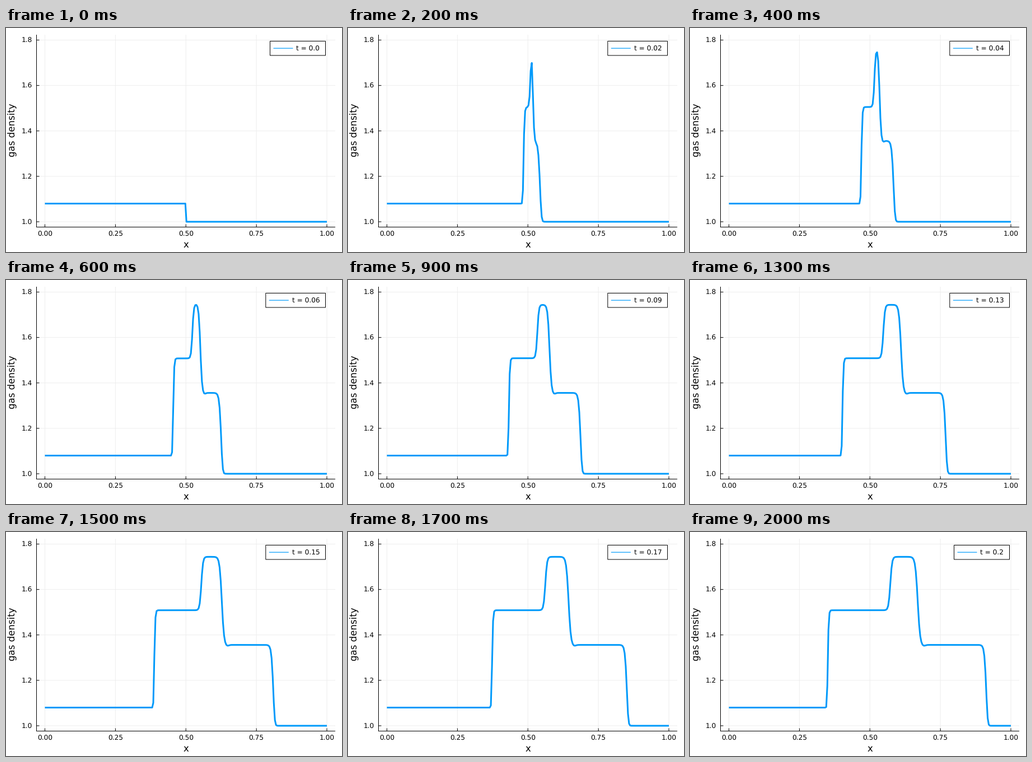
Animation, 600 px wide and 400 px high, one loop 2100 ms. Source, as a matplotlib script:

```python
import numpy as np
import matplotlib.pyplot as plt
from matplotlib.animation import FuncAnimation
from matplotlib.patches import Rectangle

plt.rcParams.update({
    "font.family": "DejaVu Sans",
    "text.hinting": "none",
    "lines.solid_capstyle": "butt",
    "lines.solid_joinstyle": "round",
    "path.snap": False,
})

W, H, DPI = 600, 400, 100
PT = 72 / DPI                    # points per pixel
BLUE = "#009afa"
TICK, GUIDE = 12.1, 16.6         # font sizes in pixels
LEFT, RIGHT, TOP, BOTTOM = 54.5, 588, 12, 355.5
FRAMES = 21

fig = plt.figure(figsize=(W / DPI, H / DPI), dpi=DPI, facecolor="white")
ax = fig.add_axes([0, 0, 1, 1])
ax.set(xlim=(0, W), ylim=(H, 0))
ax.axis("off")


def px(x):
    return 69.5 + 503.5 * x


def py(rho):
    return 346 - 405.6 * (rho - 1)


def line(xs, ys, color="black", width=1.0, z=2):
    return ax.plot(xs, ys, color=color, lw=width * PT, zorder=z)[0]


def label(x, y, s, size=TICK, **kw):
    return ax.text(x, y, s, fontsize=size * PT, **kw)


def draw_axes():
    for v in np.linspace(0, 1, 5):
        x = px(v)
        line([x, x], [TOP, BOTTOM], "#eeeeee", z=1)
        line([x, x], [BOTTOM, BOTTOM - 5])
        label(x, 372, f"{v:.2f}", ha="center", va="baseline")
    for v in np.linspace(1, 1.8, 5):
        y = py(v)
        line([LEFT, RIGHT], [y, y], "#eeeeee", z=1)
        line([LEFT, LEFT + 5], [y, y])
        label(46.7, y + 4.5, f"{v:.1f}", ha="right", va="baseline")
    line([LEFT, LEFT], [TOP, BOTTOM + 0.5])
    line([LEFT - 0.5, RIGHT], [BOTTOM, BOTTOM])
    label(321.3, 391.7, "x", GUIDE, ha="center", va="baseline")
    label(20.2, 182.3, "gas density", GUIDE, rotation=90,
          ha="right", va="center")


def front(d, w, skew=1.0):
    """Rising step; a skew above 1 makes the foot steeper than the top."""
    return (1 + np.exp(np.clip(-d / w, -60, 60))) ** -skew


def bump(d, w):
    return np.exp(-0.5 * (d / w) ** 2)


def density(x, t):
    """Four waves leaving the middle; x in pixels."""
    if t == 0:
        return np.where(x < px(0.5), 1.08, 1.0)
    early = np.exp(-(t / 0.05) ** 4)
    fl, fr = 320.15 - 375 * t, 323.7 + 1034 * t
    sl, sr = 322.2 + 177.5 * t, 321.6 + 425 * t
    wl, wr = 2.4 * t ** 0.25, 3.45 * t ** 0.3
    rho = (1.08 + (0.4286 - 0.005 * early) * front(x - fl, 0.9, 2.3)
           + (0.2352 + 0.005 * early) * front(x - sl, wl)
           - 0.3878 * front(x - sr, wr)
           - 0.356 * (1 - front(fr - x, 1.8, 2.3)))
    rho -= 0.006 * bump(x - sr - 4.6 * wr, 1.6 * wr)
    rho += 0.026 * early * bump(x - (sl + sr) / 2, 3)
    return rho


draw_axes()
xs = px(np.linspace(0, 1, 256))
curve = line(xs, py(density(xs, 0)), BLUE, 3.0, z=3)

box = Rectangle((471.5, 23.5), 99, 25.5, fc="white", ec="black",
                lw=PT, zorder=4)
ax.add_patch(box)
key = line([477.5, 512.5], [36.2, 36.2], BLUE, 1.2, z=5)
time_text = label(518.2, 41, "", ha="left", va="baseline", zorder=5)


def update(i):
    t = round(i / 100, 2)
    name = str(t)
    shift = 7.7 * (len(name) - 3)      # legend grows to the left
    curve.set_ydata(py(density(xs, t)))
    box.set_x(471.5 - shift)
    box.set_width(99 + shift)
    key.set_xdata([477.5 - shift, 512.5 - shift])
    time_text.set_x(518.2 - shift)
    time_text.set_text(f"t = {name}")
    return curve, box, key, time_text


anim = FuncAnimation(fig, update, frames=FRAMES, interval=100,
                     init_func=lambda: update(0), repeat=True,
                     repeat_delay=0, blit=False)
plt.show()
```
